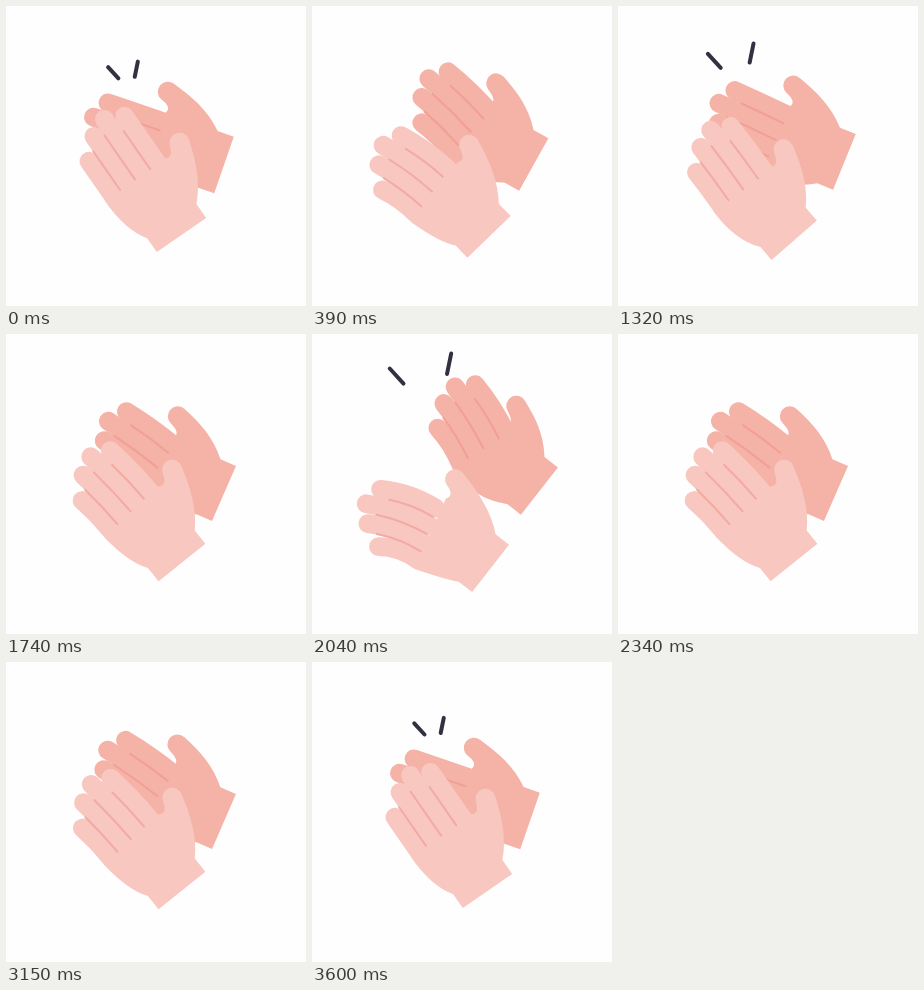
Recreate the animation shown at these times as an HTML page with a canvas. Size 300x300 px, loop 3.63 s.

```html
<!DOCTYPE html>
<html lang="en">
<head>
<meta charset="utf-8">
<title>Clapping hands</title>
<style>
  html, body { margin: 0; width: 100%; height: 100%; overflow: hidden; background: #fefefe; }
  canvas { display: block; width: 100vw; height: 100vh; }
</style>
</head>
<body>
<canvas id="stage" width="300" height="300"></canvas>
<script>
const ctx = document.getElementById('stage').getContext('2d');
const LOOP = 3630, CLAP = 615, NEAR = 495, END = 3600;
const SETTLE = 4 * CLAP + NEAR;

// Pose: cuff centre x, y, cuff angle in degrees, finger swing in radians
const front = {
  skin: '#f7c7c0', crease: '#f3aaa3',
  shut: [175.5, 229, -34.8, 0], open: [176.5, 236.5, -43.6, .11],
  wide: [178.5, 234.5, -51.8, -.32], near: [176, 228.5, -38.8, -.09]
};
const back = {
  skin: '#f5b2a7', crease: '#f29f96',
  shut: [218, 159, -71, 0], open: [230, 154.5, -66.4, .07],
  wide: [227.5, 157, -52.4, .33], near: [218, 159.5, -66.4, .21]
};
const fingers = [130, 139, 131, 113.5];
const KNUCKLE = 72, PITCH = 18.3, WIDTH = 18.8;
const pivot = [-8, -55];

const lerp = (a, b, k) => a + (b - a) * k;
const mix = (p, q, k) => p.map((v, i) => lerp(v, q[i], k));
const clamp = k => Math.max(0, Math.min(1, k));
const add = (p, d, k) => [p[0] + d[0] * k, p[1] + d[1] * k];

const overshoot = k => 1 + 2.7 * (k - 1) ** 3 + 1.7 * (k - 1) ** 2;
const phases = [
  [0, 'shut'], [105, 'open', k => k ** 2.5], [330, 'wide', overshoot],
  [NEAR, 'near', k => 1 - (1 - k) ** 2], [NEAR + 15, 'near', k => k], [CLAP, 'shut', k => k * k]
];

function poseAt(hand, u) {
  let i = 1;
  while (i < phases.length - 1 && u > phases[i][0]) i++;
  const [t0, a] = phases[i - 1], [t1, b, ease] = phases[i];
  return mix(hand[a], hand[b], ease((u - t0) / (t1 - t0)));
}

function spin(x, y, angle) {
  const c = Math.cos(angle), s = Math.sin(angle);
  const dx = x - pivot[0], dy = y - pivot[1];
  return [pivot[0] + dx * c - dy * s, pivot[1] + dx * s + dy * c];
}

// Bowed line from the given share of a finger down to its knuckle
function fingerLine(x, length, bend, from, color, width) {
  const y = lerp(-length, -KNUCKLE, from);
  ctx.beginPath();
  ctx.moveTo(x + 2 * from * (1 - from) * bend, y);
  ctx.quadraticCurveTo(x + (1 - from) * bend, (y - KNUCKLE) / 2, x, -KNUCKLE);
  ctx.strokeStyle = color;
  ctx.lineWidth = width;
  ctx.stroke();
}

function eachFinger(swing, paint) {
  ctx.save();
  ctx.translate(...pivot);
  ctx.rotate(swing);
  ctx.translate(-pivot[0], -pivot[1]);
  fingers.forEach((length, i) => paint(21 - PITCH * i, length, i));
  ctx.restore();
}

function drawPalm(swing) {
  const heel = spin(-43.5, -KNUCKLE, swing), side = spin(-43.5, -36, swing);
  const crook = spin(31, -KNUCKLE, swing / 2), thumb = spin(51, -77, swing * .3);
  const cuff = [30, -17];
  const len = Math.hypot(cuff[0] - thumb[0], cuff[1] - thumb[1]);
  const d = [(cuff[0] - thumb[0]) / len, (cuff[1] - thumb[1]) / len];
  const o = [d[1], -d[0]], angle = Math.atan2(o[1], o[0]);
  const outer = add(thumb, o, 10), inner = add(thumb, o, -10);

  ctx.beginPath();
  ctx.moveTo(...heel);
  ctx.quadraticCurveTo(...side, -30, -17);
  ctx.lineTo(-30, 0);
  ctx.lineTo(30, 0);
  ctx.lineTo(...cuff);
  ctx.bezierCurveTo(...add(add(cuff, o, 10), d, -20), ...add(add(outer, d, 22), o, 1), ...outer);
  ctx.arc(...thumb, 10, angle, angle + Math.PI, true);
  ctx.quadraticCurveTo(...add(inner, d, 13), ...crook);
  ctx.closePath();
  ctx.fill();
}

function drawHand(hand, u) {
  const [x, y, tilt, swing] = poseAt(hand, u);
  const bend = 20 * Math.max(-swing, swing / 2);
  ctx.save();
  ctx.translate(x, y);
  ctx.rotate(tilt * Math.PI / 180);
  ctx.fillStyle = hand.skin;
  eachFinger(swing, (fx, length) => fingerLine(fx, length, bend, 0, hand.skin, WIDTH));
  drawPalm(swing);
  eachFinger(swing, (fx, length, i) => {
    if (i < 3) fingerLine(fx - PITCH / 2, length, bend, .2, hand.crease, 2);
  });
  ctx.restore();
}

function drawMarks(u) {
  const t = u > CLAP - 70 ? u - CLAP : u;
  const head = 1 - (1 - clamp((t + 70) / 300)) ** 1.2, tail = clamp(t / 350);
  if (head - tail < .01) return;
  ctx.strokeStyle = '#352f42';
  ctx.lineWidth = 4;
  for (const [p, q] of [[[112.5, 72.5], [75, 31.5]], [[128.7, 71], [140, 15.5]]]) {
    ctx.beginPath();
    ctx.moveTo(...mix(p, q, tail));
    ctx.lineTo(...mix(p, q, head));
    ctx.stroke();
  }
}

function draw(t) {
  // The last clap closes slowly
  const u = t < SETTLE ? t % CLAP : lerp(NEAR, CLAP, clamp((t - SETTLE) / (END - SETTLE)));
  ctx.clearRect(0, 0, 300, 300);
  ctx.lineCap = ctx.lineJoin = 'round';
  drawMarks(u);
  drawHand(back, u);
  drawHand(front, u);
}

const start = performance.now();
function tick() {
  draw((performance.now() - start) % LOOP);
  requestAnimationFrame(tick);
}
tick();
</script>
</body>
</html>
```
